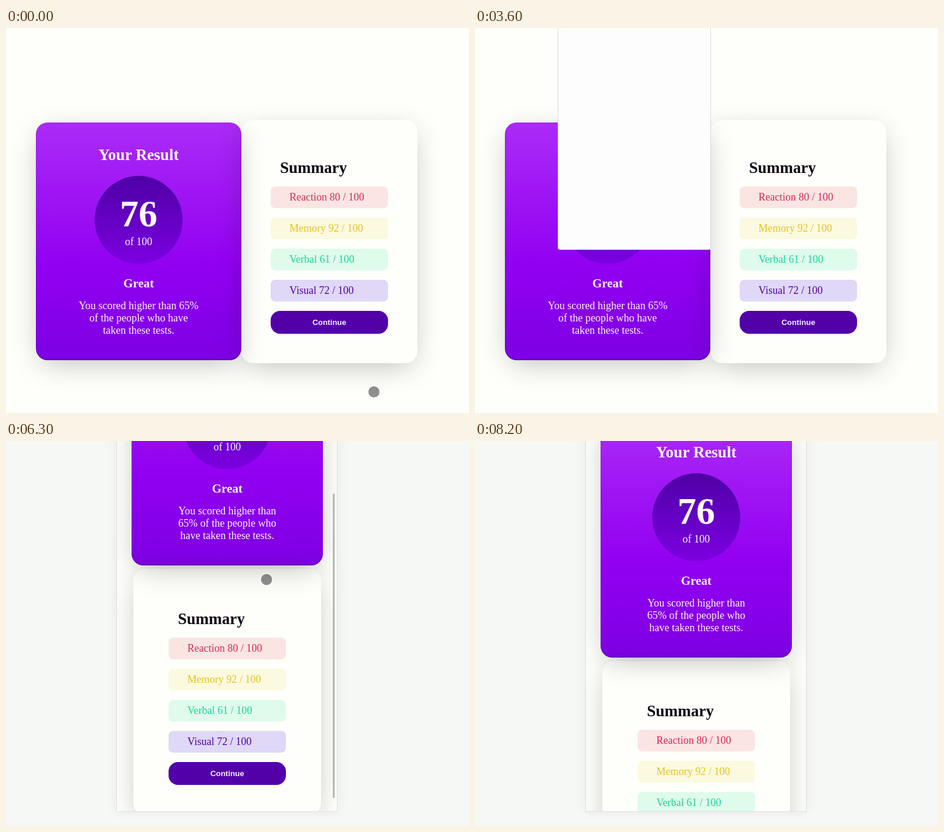
Animation of 789x656 px, one loop 8.9 s. Source, as an HTML page:

```html
<!DOCTYPE html>
<html lang="en">
<head>
<meta charset="utf-8">
<title>Result summary</title>
<style>
  html, body { margin: 0; width: 100%; height: 100%; overflow: hidden; background: #fefffb; }
  #stage { position: relative; width: 789px; height: 656px; overflow: hidden;
    font: 18px/21px "Liberation Serif", "Times New Roman", serif; }
  #stage div, #stage svg { position: absolute; box-sizing: border-box; }
  .wide, .back { inset: 0; }
  .back { background: #f6f8f6; }
  .phone { left: 188px; top: -37px; width: 377px; height: 669px; overflow: hidden;
    background: #fefffb; border: 1px solid #dfe0de; }
  .glow { left: 188px; top: -37px; width: 377px; height: 669px; box-shadow: 0 0 22px rgba(0,0,0,.06); }
  .page { left: 0; top: 0; width: 375px; height: 855px; }

  .result, .summary { border-radius: 20px; box-shadow: 0 12px 50px -10px rgba(0,0,0,.28); }
  .result { height: 405px; color: #fdfaff; text-align: center;
    background: linear-gradient(#ab2bf7, #9200f1 60%, #7d00e3);
    box-shadow: 0 12px 50px -10px rgba(0,0,0,.28), inset 0 -1px 2px rgba(40,0,80,.5); }
  .wide .result { left: 51px; top: 161px; width: 350px; }
  .wide .summary { left: 401px; top: 157px; width: 300px; height: 414px; }
  .phone .result { left: 25px; top: 0; width: 326px; }
  .phone .summary { left: 28px; top: 411px; width: 320px; height: 419px; }

  .mid { left: 0; right: 0; }
  .title { top: 40px; font: bold 27px/30px "Liberation Serif", serif; }
  .disc { left: 50%; margin-left: -75px; top: 91px; width: 150px; height: 150px; border-radius: 50%;
    background: linear-gradient(#4e00a6, #7c00e1); }
  .score { top: 120px; font: bold 64px/72px "Liberation Serif", serif; }
  .of { top: 193px; }
  .grade { top: 262px; font: bold 21px/24px "Liberation Serif", serif; }
  .note { top: 302px; left: 50%; width: 210px; margin-left: -105px; }
  .phone .note { width: 186px; margin-left: -93px; }

  .list { left: 50%; margin-left: -100px; width: 200px; bottom: 50px; height: 298px; }
  .phone .list { bottom: auto; top: 70px; }
  .head { left: 16px; top: 0; font: bold 27px/30px "Liberation Serif", serif; color: #0c0410; }
  .row { left: 0; width: 200px; height: 37px; border-radius: 8px; padding-left: 32px; line-height: 37px; }
  .go { left: 0; top: 259px; width: 200px; height: 39px; border-radius: 16px; background: #5200a8;
    color: #f7eeff; text-align: center; font: bold 13.333px/39px "Liberation Sans", Arial, sans-serif; }

  .thumb { left: 368px; width: 3px; height: 518px; background: #b4b5b3; }
  .menu { left: 141px; top: 0; width: 261px; height: 378px; background: #fdfdfd;
    border: 1px solid #d8d8d8; border-top: 0; border-radius: 0 0 4px 4px; }
  .dot { left: -11.5px; top: -11.5px; width: 23px; height: 23px; border-radius: 50%;
    border: 2px solid rgba(255,255,255,.35); background: rgba(17,14,17,.46) padding-box; }
  .arrow { left: 0; top: 0; }
</style>
</head>
<body>
<div id="stage">
  <div class="wide" id="wide"></div>
  <div class="back" id="small">
    <div class="glow"></div>
    <div class="phone">
      <div class="page" id="page"></div>
      <div class="thumb" id="thumb"></div>
    </div>
  </div>
  <div class="menu" id="menu"></div>
  <div id="pointer">
    <div class="dot" id="dot"></div>
    <svg class="arrow" id="arrow" width="13" height="20" viewBox="0 0 13 20">
      <path d="M.6 .8V16.2L4.2 12.9L6.6 18.5L9 17.5L6.6 12H11.6Z" fill="#111" stroke="#fff"/>
    </svg>
  </div>
</div>
<script>
const LOOP = 8900, TICK = 100;
const $ = id => document.getElementById(id);

const rows = [
  ["Reaction 80 / 100", "#fbe5e3", "#dc2850"],
  ["Memory 92 / 100", "#fbf9df", "#eac31e"],
  ["Verbal 61 / 100", "#dffbec", "#14dc97"],
  ["Visual 72 / 100", "#dfd8f7", "#5000a8"]
];

const cards = `
  <div class="result">
    <div class="mid title">Your Result</div>
    <div class="disc"></div>
    <div class="mid score">76</div>
    <div class="mid of">of 100</div>
    <div class="mid grade">Great</div>
    <div class="note">You scored higher than 65% of the people who have taken these tests.</div>
  </div>
  <div class="summary"><div class="list">
    <div class="head">Summary</div>
    ${rows.map(([text, bg, ink], i) =>
      `<div class="row" style="top:${47 + i * 53}px;background:${bg};color:${ink}">${text}</div>`).join("")}
    <div class="go">Continue</div>
  </div></div>`;
$("wide").innerHTML = $("page").innerHTML = cards;

// pointer: time, x, y, shape (none = hidden)
const moves = [
  [0, 626.5, 619.5, "dot"], [200, 623, 604, "dot"], [300, 614, 580, "dot"],
  [400, 603, 556, "dot"], [500, 595.5, 541.5, "dot"],
  [700, 590, 525, "dot"], [800, 589, 510, "dot"], [900, 603, 498, "dot"],
  [1000, 624, 494, "dot"], [1100, 640, 499, "dot"],
  [1300, 590, 507, "dot"], [1400, 510, 515, "dot"], [1500, 420, 512, "dot"], [1600, 354, 505, "dot"],
  [1800, 344, 460, "dot"], [1900, 364, 382, "dot"], [2000, 386, 306, "dot"], [2100, 382, 240, "dot"],
  [2300, 362, 100, "dot"], [2400, 342, 9, "arrow"], [2600, 0, 0],
  [5200, 287, 8, "dot"], [5300, 345, 92, "dot"], [5400, 420, 195, "dot"], [5500, 464.5, 256.5, "dot"],
  [5700, 464.5, 254, "dot"], [6000, 447.5, 237.5, "dot"],
  [6200, 445.5, 320, "dot"], [6300, 443.5, 235.5, "dot"], [6400, 443, 204, "dot"], [6500, 443, 170, "dot"],
  [6700, 443, 185, "dot"]
].concat([
  [6800, 444, 215, "dot"], [6900, 444.5, 260, "dot"], [7000, 445, 300, "dot"], [7100, 445.5, 329.5, "dot"],
  [7400, 436, 340, "dot"], [7500, 392, 275, "dot"], [7600, 330, 190, "dot"], [7700, 268, 118, "dot"],
  [7800, 222.5, 75.5, "dot"], [8000, 165, 36, "arrow"], [8100, 115, 5, "arrow"], [8200, 0, 0]
]);

// page scroll: time, offset
const scrolls = [
  [0, 0], [6200, 72], [6300, 157], [6400, 187], [6500, 188],
  [6700, 173], [6800, 143], [6900, 98], [7000, 58], [7100, 29], [7400, 0]
];

const at = (steps, t) => steps.findLast(s => s[0] <= t);
const show = (el, on) => { el.style.visibility = on ? "inherit" : "hidden"; };
const within = (t, a, b) => t >= a && t < b;

function draw(now) {
  const t = Math.floor(now % LOOP / TICK) * TICK;
  const [, x, y, shape] = at(moves, t);
  const offset = at(scrolls, t)[1];

  show($("wide"), t < 5000);
  show($("small"), t >= 5000);
  show($("menu"), within(t, 3600, 4800));
  show($("thumb"), within(t, 6200, 7700));
  $("page").style.transform = `translateY(${-offset}px)`;
  $("thumb").style.top = `${Math.round(3 + offset * .781)}px`;
  $("pointer").style.transform = `translate(${x}px, ${y}px)`;
  show($("dot"), shape === "dot");
  show($("arrow"), shape === "arrow");
}

const start = performance.now();
function loop() {
  draw(performance.now() - start);
  requestAnimationFrame(loop);
}
loop();
</script>
</body>
</html>
```
